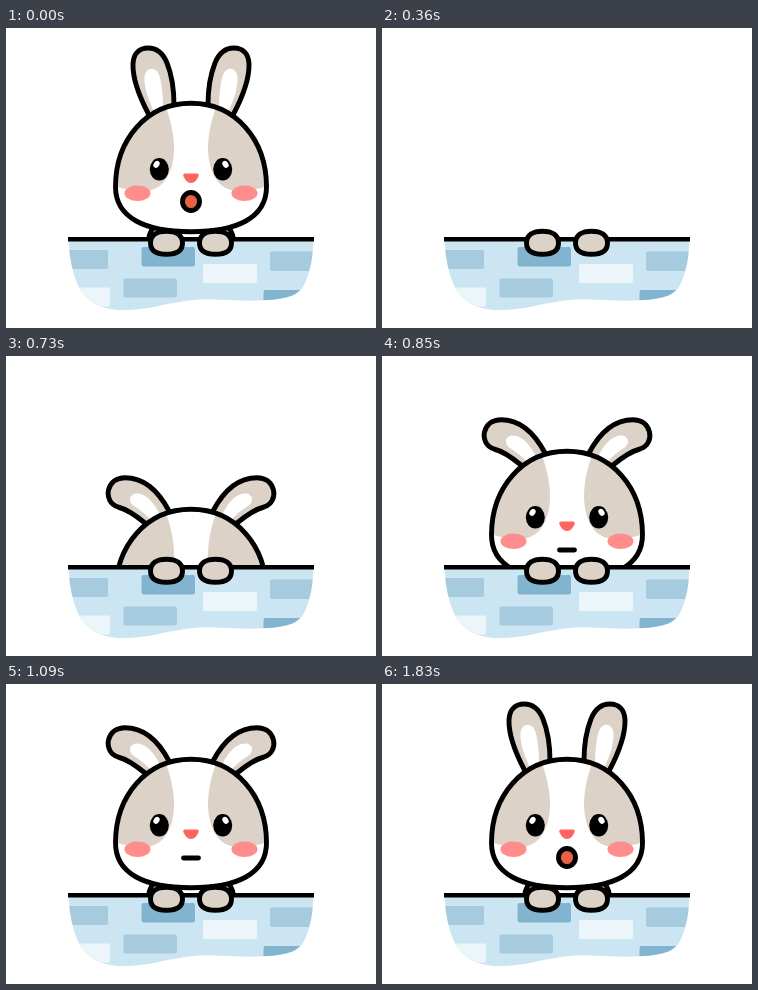
Write an HTML page that moves like this. It is 370 px wide and 300 px high and loops after 1950 ms.

```html
<!DOCTYPE html>
<html lang="en">
<head>
<meta charset="utf-8">
<title>Peeking bunny</title>
<style>
  html, body { margin: 0; width: 100%; height: 100%; overflow: hidden; background: #fff; }
  svg { display: block; width: 100vw; height: 100vh; }

  .ink { stroke: #000; stroke-width: 4.9; stroke-linecap: round; stroke-linejoin: round; }
  .line { fill: none; }
  .fur { fill: #ddd2c7; }
  .white { fill: #fff; }
  .pale { fill: #ecf5fa; }
  .mid { fill: #a6cbdf; }
  .deep { fill: #82b4d0; }

  /* Every part holds its pose and then jumps to the next one. */
  .rise, .paw-first, .paw-second, .ears-up, .ears-down,
  .eyes-open, .eyes-shut, .mouth-flat, .mouth-round {
    animation: 1950ms step-end infinite;
  }
  .rise { animation-name: rise; }
  .paw-first { animation-name: paw-first; }
  .paw-second { animation-name: paw-second; }
  .ears-up { animation-name: ears-up; }
  .ears-down { animation-name: ears-down; }
  .eyes-open { animation-name: eyes-open; }
  .eyes-shut { animation-name: eyes-shut; }
  .mouth-flat { animation-name: mouth-flat; }
  .mouth-round { animation-name: mouth-round; }

  @keyframes rise {
    0% { transform: translateY(0); }
    6.15% { transform: translateY(200px); }
    24.61% { transform: translateY(136px); }
    37.43% { transform: translateY(78px); }
    43.58% { transform: translateY(20px); }
    49.74%, 100% { transform: translateY(0); }
  }
  @keyframes paw-first {
    0%, 12.3%, 100% { visibility: visible; }
    6.15% { visibility: hidden; }
  }
  @keyframes paw-second {
    0%, 18.46%, 100% { visibility: visible; }
    6.15% { visibility: hidden; }
  }
  @keyframes ears-up {
    0%, 49.74%, 74.87%, 100% { visibility: visible; }
    6.15%, 55.89% { visibility: hidden; }
  }
  @keyframes ears-down {
    0%, 49.74%, 74.87%, 100% { visibility: hidden; }
    6.15%, 55.89% { visibility: visible; }
  }
  @keyframes eyes-open {
    0%, 93.84%, 100% { visibility: visible; }
    87.69% { visibility: hidden; }
  }
  @keyframes eyes-shut {
    0%, 93.84%, 100% { visibility: hidden; }
    87.69% { visibility: visible; }
  }
  @keyframes mouth-round {
    0%, 74.87%, 100% { visibility: visible; }
    6.15% { visibility: hidden; }
  }
  @keyframes mouth-flat {
    0%, 74.87%, 100% { visibility: hidden; }
    6.15% { visibility: visible; }
  }
</style>
</head>
<body>
<svg viewBox="0 0 370 300" preserveAspectRatio="none">
  <defs>
    <path id="head" d="M185 75.300C140 75.300 110 112 109.500 158C109 191 141 203.700 185 203.700C229 203.700 261 191 260.500 158C260 112 230 75.300 185 75.300Z"/>
    <path id="wall" d="M62.500 211C63.500 235 69 256 78 267C88 279 105 283 122 282C150 281 165 273 195 271.500C225 271 235 274 262 272C281 271 294 267 299 255C304.500 243 307 228 307.500 211Z"/>
    <clipPath id="in-head"><use href="#head"/></clipPath>
    <clipPath id="in-wall"><use href="#wall"/></clipPath>
    <clipPath id="above-wall"><path d="M0 0H370V210H0Z"/></clipPath>

    <!-- Left halves, mirrored for the right side -->
    <g id="ear-up">
      <path class="ink fur" d="M143 87C134 70 126.500 52 127 36C127.500 25 134 20 142 20C151 20 157 25 161 35C167 50 168 62 168 77"/>
      <path class="white" d="M149 86C140 68 138 56 138.500 49C140 38.500 150 38 153.500 48C156 58 157 68 157 82Z"/>
    </g>
    <g id="ear-down">
      <path class="ink fur" d="M139 89C128 80 120 75 112 73C104 70.500 101 63 102.500 56C104.500 48 111 43.700 119 43.700C139 43.700 153 58 163 77"/>
      <path class="white" d="M145 86C137 78 133 75 128 72C121.500 68 123 59.500 131 59.500C141 60 149 70 154 81Z"/>
    </g>
    <path id="patch" class="fur" d="M155 68C163 84 168 104 168 120C168 143 158 163 138 163C126 163 118 161 108 158V68Z"/>
    <ellipse id="cheek" cx="131.500" cy="165.200" rx="13" ry="7.700" fill="#ff8d8c"/>
    <g id="eye-open">
      <ellipse cx="153.300" cy="141.300" rx="9.500" ry="11.200"/>
      <ellipse class="white" cx="150.500" cy="136.300" rx="2.800" ry="3.700" transform="rotate(35 150.500 136.300)"/>
    </g>
    <path id="eye-shut" class="ink line" d="M143.500 141Q153 149 162.500 141"/>
    <path id="paw" class="ink fur" d="M160.500 203.200C170 203.200 176.500 207 176.500 215C176.500 223 170 226.300 160.500 226.300C151 226.300 144.500 223 144.500 215C144.500 207 151 203.200 160.500 203.200Z"/>
  </defs>

  <g clip-path="url(#above-wall)">
    <g class="rise">
      <path class="ink white" d="M142 213C143 206 146 199 153 194H217C224 199 227 206 228 213"/>
      <g class="ears-up">
        <use href="#ear-up"/>
        <use href="#ear-up" transform="matrix(-1 0 0 1 370 0)"/>
      </g>
      <g class="ears-down">
        <use href="#ear-down"/>
        <use href="#ear-down" transform="matrix(-1 0 0 1 370 0)"/>
      </g>
      <use href="#head" class="white"/>
      <g clip-path="url(#in-head)">
        <use href="#patch"/>
        <use href="#patch" transform="matrix(-1 0 0 1 370 0)"/>
      </g>
      <use href="#cheek"/>
      <use href="#cheek" transform="matrix(-1 0 0 1 370 0)"/>
      <use href="#head" class="ink line"/>
      <g class="eyes-open">
        <use href="#eye-open"/>
        <use href="#eye-open" transform="matrix(-1 0 0 1 370 0)"/>
      </g>
      <g class="eyes-shut">
        <use href="#eye-shut"/>
        <use href="#eye-shut" transform="matrix(-1 0 0 1 370 0)"/>
      </g>
      <path fill="#ff6463" d="M179 145.500H191Q194 146 192 149.500Q189 155 185 155Q181 155 178 149.500Q176 146 179 145.500Z"/>
      <path class="ink line mouth-flat" d="M177.500 174H192.500"/>
      <ellipse class="ink mouth-round" cx="185" cy="173.500" rx="8.500" ry="9" fill="#ea5f45"/>
    </g>
  </g>

  <use href="#wall" fill="#cce5f2"/>
  <g clip-path="url(#in-wall)">
    <rect class="mid" x="50" y="222" width="52" height="19" rx="2"/>
    <rect class="deep" x="135.500" y="219" width="53.500" height="19.500" rx="2"/>
    <rect class="pale" x="197" y="236" width="54" height="19" rx="2"/>
    <rect class="mid" x="264" y="223.500" width="54" height="19.500" rx="2"/>
    <rect class="mid" x="117.500" y="250.500" width="53.500" height="19" rx="2"/>
    <rect class="pale" x="50" y="259.500" width="54" height="19" rx="2"/>
    <rect class="deep" x="257.500" y="262" width="54" height="19" rx="2"/>
  </g>
  <path d="M62 209H308V213.500H62Z"/>

  <g class="paw-first"><use href="#paw"/></g>
  <g class="paw-second"><use href="#paw" transform="matrix(-1 0 0 1 370 0)"/></g>
</svg>
</body>
</html>
```
